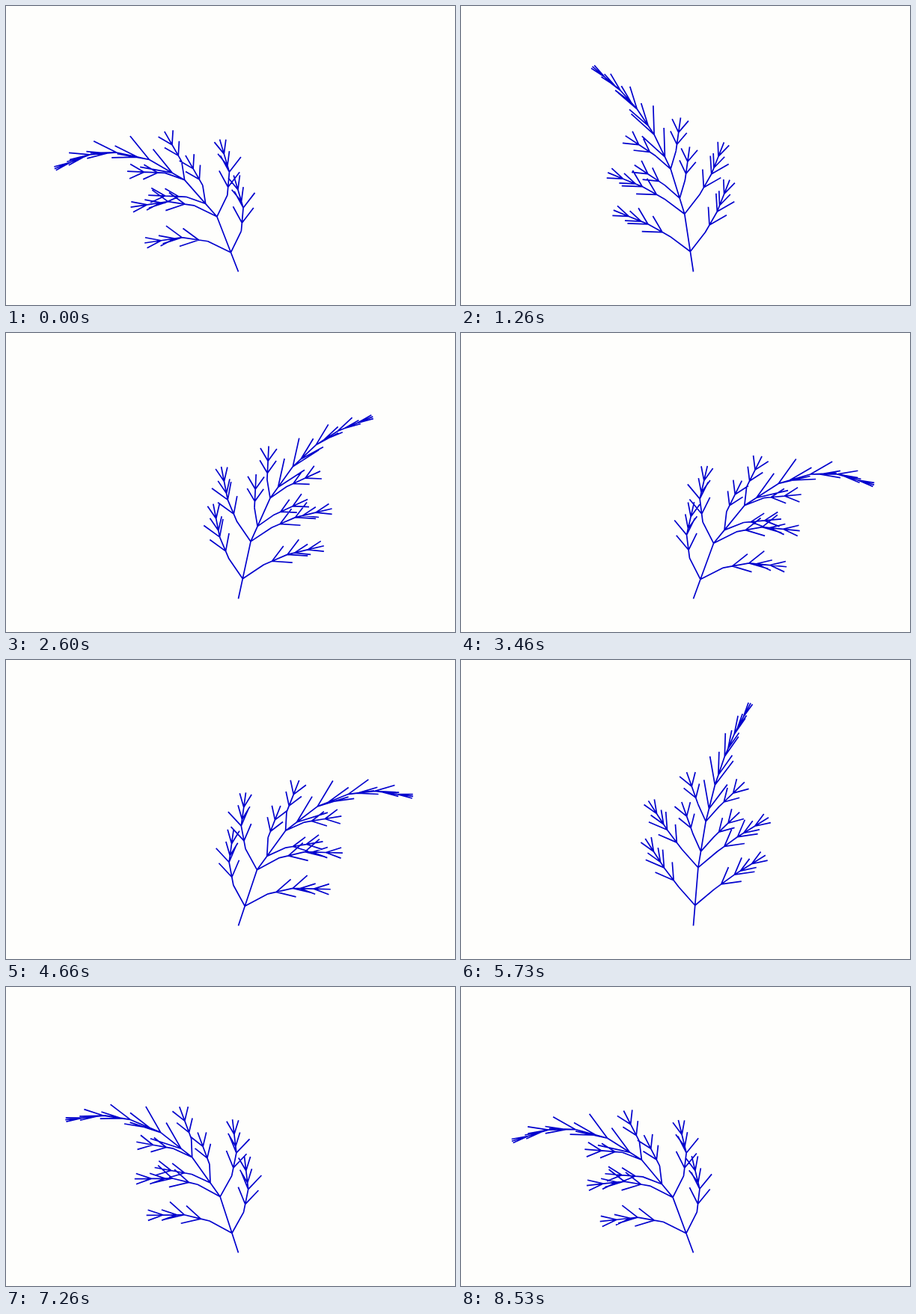
An HTML page with a canvas for the animation above (8660 ms loop, 600 by 400 pixels).

```html
<!DOCTYPE html>
<html lang="en">
<head>
<meta charset="utf-8">
<title>Swaying plant</title>
<style>
html, body { margin: 0; width: 100%; height: 100%; overflow: hidden; background: #fefefc; }
canvas { display: block; }
</style>
</head>
<body>
<canvas id="stage" width="600" height="400"></canvas>
<script>
const ctx = document.getElementById('stage').getContext('2d');
const LOOP = 8660, POSE = 400 / 3;      // ms
const SWING = 0.336;                    // largest bend per section, radians
const STRETCH = 1.125;                  // the plant is drawn wider than tall
const FORK = 0.35;                      // where the first pair of shoots leaves a section
const SPREAD = 0.74, NARROW = 0.71;     // angle of the shoots, and its change per section
const SHRINK = 0.8, BRANCH = 0.4, TWIG = 0.78;

let bend = 0;

function line([x, y], dir, len) {
  const end = [x + STRETCH * len * Math.sin(dir), y - len * Math.cos(dir)];
  ctx.moveTo(x, y);
  ctx.lineTo(...end);
  return end;
}

// A pair of shoots: branches low on the stem, plain twigs elsewhere
function shoots(p, dir, len, level, isStem) {
  for (const side of [-1, 1]) {
    const d = dir + side * SPREAD * NARROW ** (level - 1);
    if (isStem && level < 3) {
      const size = len * BRANCH;
      grow(line(p, d, size), d + bend, size, 2, 3 - level, false);
    } else {
      line(p, d, len * TWIG);
    }
  }
}

function grow(p, dir, len, level, count, isStem) {
  for (let i = 0; i < count; i++) {
    const d = dir + i * bend;
    for (const part of [FORK, 1 - FORK]) {
      p = line(p, d, len * part);
      shoots(p, d, len, level + i, isStem);
    }
    len *= SHRINK;
  }
  line(p, dir + (count - 1) * bend, len);
}

function draw(t) {
  const pose = Math.floor(t / POSE + 0.56);
  bend = -SWING * Math.cos(0.15 + 0.101 * pose);
  ctx.fillStyle = '#fefefc';
  ctx.fillRect(0, 0, 600, 400);
  ctx.strokeStyle = '#0000cd';
  ctx.lineWidth = 1.7;
  ctx.beginPath();
  grow([310.5, 355.5], bend, 78, 1, 6, true);
  ctx.stroke();
}

const start = performance.now();
function tick() {
  draw((performance.now() - start) % LOOP);
  requestAnimationFrame(tick);
}
tick();
</script>
</body>
</html>
```
